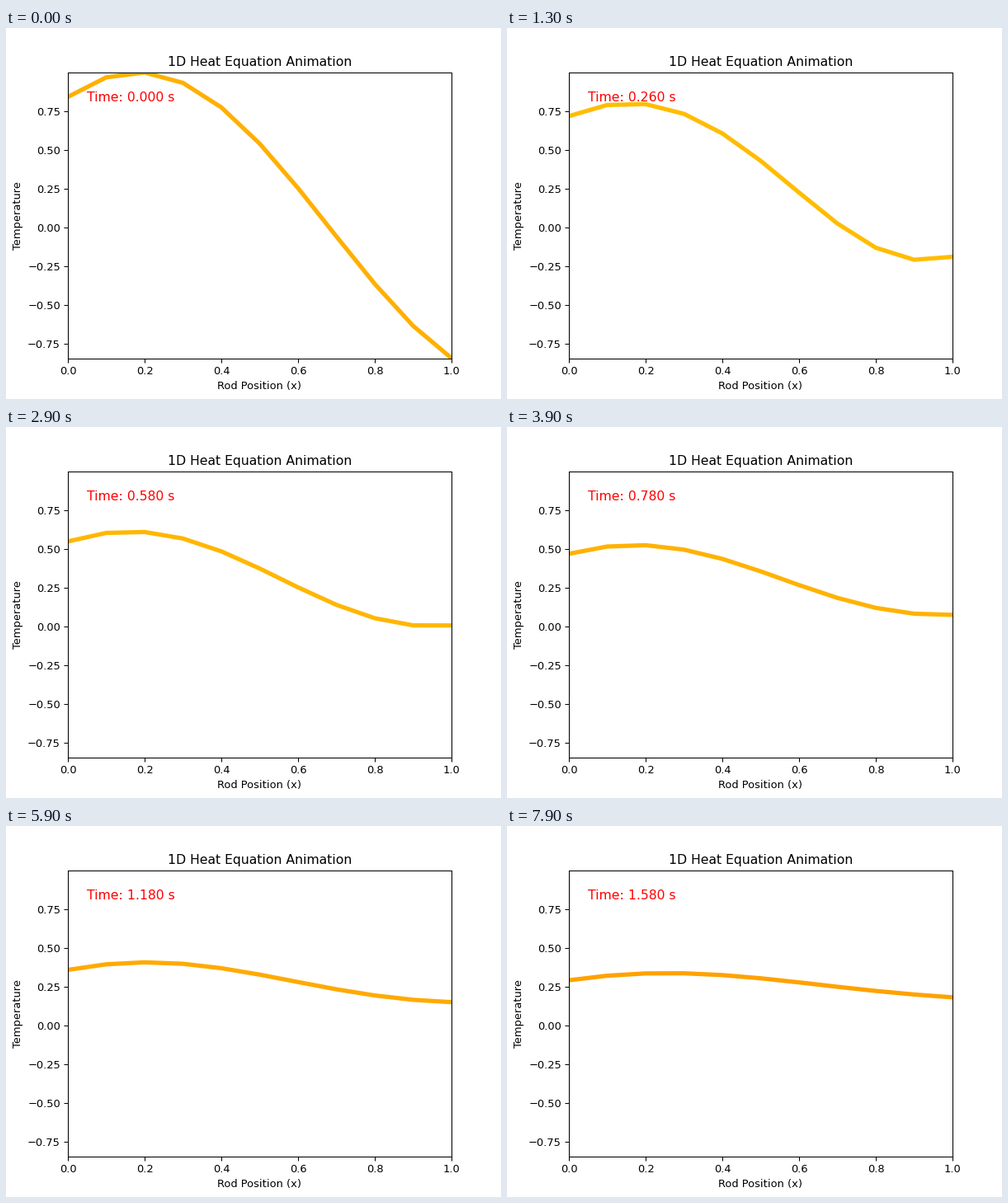
These frames come from a looping animation (600 px wide and 450 px high, 8 s). A matplotlib script:

```python
import matplotlib.pyplot as plt
import numpy as np
from matplotlib.animation import FuncAnimation

plt.rcParams["font.family"] = "DejaVu Sans"

ALPHA, DX, DT = 0.1, 0.1, 0.01
FRAMES, INTERVAL, STEPS = 80, 100, 2

x = np.linspace(0, 1, 11)
u0 = np.sin(np.pi * x + 1)


def step(u):
    """Explicit heat step; both ends radiate: u' = u on the left, u' = -u on the right."""
    new = u.copy()
    new[1:-1] += ALPHA * DT / DX**2 * np.diff(u, 2)
    new[0] = new[1] / (1 + DX)
    new[-1] = new[-2] / (1 + DX)
    return new


history = [u0]
for _ in range(STEPS * (FRAMES - 1)):
    history.append(step(history[-1]))

fig, ax = plt.subplots(figsize=(6.4, 4.8), dpi=93.75)
ax.set_xlim(0, 1)
ax.set_ylim(u0.min(), u0.max())
ax.set_title("1D Heat Equation Animation")
ax.set_xlabel("Rod Position (x)")
ax.set_ylabel("Temperature")

norm = plt.Normalize(u0.min(), u0.max())
line, = ax.plot(x, u0, lw=4)
label = ax.text(0.05, 0.9, "", transform=ax.transAxes, fontsize=12, color="red")


def update(i):
    u = history[i * STEPS]
    line.set_ydata(u)
    line.set_color(plt.cm.hot(norm(u.mean())))
    label.set_text(f"Time: {i * STEPS * DT:.3f} s")
    return line, label


anim = FuncAnimation(fig, update, frames=FRAMES, interval=INTERVAL, repeat=True)
plt.show()
```
